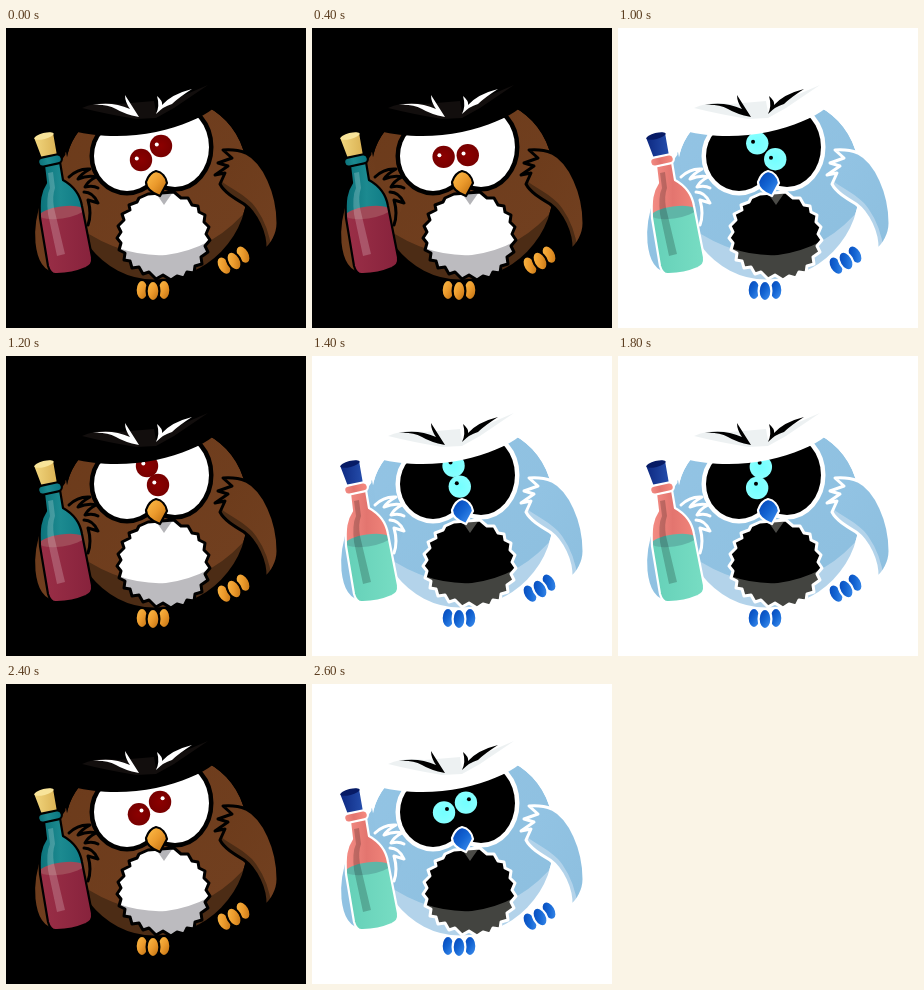
Recreate the animation shown at these times as an HTML page. Size 300 by 300 pixels, loop 2.8 s.

```html
<!DOCTYPE html>
<html lang="en">
<head>
<meta charset="utf-8">
<title>Dizzy owl</title>
<style>
  html, body { margin: 0; width: 100%; height: 100%; overflow: hidden; background: #000; }
  svg { display: block; width: 100vw; height: 100vh; }
  svg.negative { filter: invert(1); }
  .ink { stroke: #000; stroke-width: 3; stroke-linejoin: round; stroke-linecap: round; }
  .thin { stroke-width: 2.2; }
  .thick { stroke-width: 7; }
  .line { fill: none; }
</style>
</head>
<body>
<svg id="owl" viewBox="0 0 300 300">
  <defs>
    <linearGradient id="brown" x1="0" y1="0" x2="1" y2="1">
      <stop offset="0" stop-color="#6c3b1b"/><stop offset="1" stop-color="#724020"/>
    </linearGradient>
    <linearGradient id="orange" x1="0" y1="0" x2="1" y2="1">
      <stop offset="0" stop-color="#ffc04c"/><stop offset=".5" stop-color="#eb9a2c"/><stop offset="1" stop-color="#b8680c"/>
    </linearGradient>
    <linearGradient id="cork" x1="0" x2="1">
      <stop offset="0" stop-color="#f3d880"/><stop offset="1" stop-color="#d9b052"/>
    </linearGradient>
    <linearGradient id="glass" x1="0" x2="1">
      <stop offset="0" stop-color="#0b727a"/><stop offset=".4" stop-color="#1c8a90"/><stop offset="1" stop-color="#087480"/>
    </linearGradient>
    <linearGradient id="wine" x1="0" x2="1">
      <stop offset="0" stop-color="#9c3048"/><stop offset="1" stop-color="#84203a"/>
    </linearGradient>
    <radialGradient id="iris">
      <stop offset="0" stop-color="#8c0000"/><stop offset="1" stop-color="#780000"/>
    </radialGradient>
    <path id="body" d="M58 140C60 102 90 72 150 70C200 62 243 95 243 150C246 212 200 253 148 253C95 253 56 202 58 140Z"/>
    <path id="belly" d="M142 166L133 170 131 174 123 177 124 182 116 186 118 192 112 198 115 204 111 210 115 215 113 222 119 225 118 232 124 233 126 240 133 239 137 246 143 244 150 251 157 247 165 252 171 248 178 250 181 244 188 245 189 238 196 236 195 229 202 224 199 218 204 212 200 206 203 199 198 194 199 187 193 184 192 178 186 177 182 170 175 170 168 164Z"/>
    <path id="bottle" d="M38 138L54 134 57 152C66 157 74 166 76 178L86 229C87 236 84 238 80 240Q66 246 51 246C46 247 43 242 42 238L34 190C33 172 34 164 40 155Z"/>
    <path id="wing" d="M240 125C258 134 272 165 272 195C272 206 266 217 259 222C260 205 250 185 238 176C228 170 218 164 214 156L219 145 209 147 222 138 212 135 226 130 217 122Q230 121 240 125Z"/>
    <path id="shade" d="M60 190Q110 230 160 227Q215 220 250 170V270H60Z"/>
    <clipPath id="inBody"><use href="#body"/></clipPath>
    <clipPath id="inBelly"><use href="#belly"/></clipPath>
    <clipPath id="inBottle"><use href="#bottle"/></clipPath>
    <clipPath id="inWing"><use href="#wing"/></clipPath>
    <ellipse id="toe" rx="6.4" ry="10" class="ink thin" fill="url(#orange)"/>
    <g id="foot">
      <use href="#toe" x="-11" y="-1"/><use href="#toe" x="11" y="-1"/><use href="#toe"/>
    </g>
  </defs>

  <rect width="300" height="300"/>

  <use href="#body" class="ink" fill="url(#brown)"/>
  <use href="#shade" fill="#4c2c15" clip-path="url(#inBody)"/>
  <use href="#body" class="ink line"/>

  <use href="#foot" x="147" y="263"/>
  <use href="#foot" transform="translate(228 233) rotate(-30)"/>

  <use href="#belly" fill="#fff"/>
  <g clip-path="url(#inBelly)">
    <use href="#shade" fill="#bcbbbf"/>
    <path d="M149 164L167 164 158 177Z" fill="#b4b4b8"/>
  </g>
  <use href="#belly" class="ink line"/>

  <use href="#wing" fill="url(#brown)"/>
  <path d="M208 148C222 160 240 166 250 180Q264 200 266 226H240L205 170Z" fill="#4c2c15" clip-path="url(#inWing)"/>
  <use href="#wing" class="ink line"/>

  <path d="M60 124C40 150 25 185 28 215C30 235 38 245 50 246C72 240 82 215 86 190L92 174 91 160 80 157 90 149 73 150 84 141 64 145Z" fill="url(#brown)"/>
  <path class="ink line" d="M58 126C40 150 25 185 28 215C30 235 38 245 50 246M63 149Q72 140 84 141Q75 146 72 151Q82 147 90 149Q82 153 79 159Q87 157 92 160M78 164Q87 164 92 175L82 172Q86 186 82 197"/>

  <g fill="#fff">
    <g class="ink thick">
      <ellipse cx="121" cy="128" rx="34" ry="36"/><ellipse cx="169" cy="119" rx="35" ry="41"/>
    </g>
    <ellipse cx="121" cy="128" rx="33" ry="35"/><ellipse cx="169" cy="119" rx="34" ry="40"/>
  </g>

  <g class="pupil"><circle r="11.2" fill="url(#iris)"/><circle class="glint" r="2" fill="#fff"/></g>
  <g class="pupil"><circle r="11.2" fill="url(#iris)"/><circle class="glint" r="2" fill="#fff"/></g>

  <path d="M68 103C90 109 122 110 150 104C176 98 195 90 208 80L216 52 150 60 140 66 68 68Z"/>
  <path d="M76 80Q92 73 112 76L148 73 150 84 162 74 202 57 168 80 150 90 130 91Q100 86 76 80Z" fill="#120e0d"/>
  <g fill="#fff">
    <path d="M87 77Q106 73 124 81Q119 74 119 67Q126 78 133 89Q118 86 110 81Q100 76 87 77Z"/>
    <path d="M150 86Q154 78 151 68Q157 73 156 77Q166 66 186 61Q172 70 166 76Q158 78 150 86Z"/>
  </g>

  <path class="ink thin" d="M150 143C156 144 160 149 161 155L154 168C146 165 140 160 140 154C142 148 146 144 150 143Z" fill="url(#orange)"/>

  <use href="#bottle" fill="url(#glass)"/>
  <g clip-path="url(#inBottle)">
    <path d="M30 188L80 181 95 255H35Z" fill="url(#wine)"/>
    <ellipse cx="55.5" cy="184.5" rx="22" ry="6" transform="rotate(-8 55.5 184.5)" fill="#a04a58"/>
    <path d="M42 145L47 144 49 160Q46 168 48 180L59 226 51 228 42 186Q40 168 44 160Z" fill="#fff" opacity=".2"/>
  </g>
  <use href="#bottle" class="ink thin line"/>
  <path class="ink thin" d="M27 110Q37 102 48 104L52 127Q44 133 35 131Z" fill="url(#cork)"/>
  <ellipse cx="38" cy="108" rx="10" ry="3" transform="rotate(-14 38 108)" fill="#f8e49a"/>
  <rect class="ink thin" x="32" y="128" width="24" height="9" rx="4.5" transform="rotate(-12 44 132.5)" fill="url(#glass)"/>
</svg>

<script>
  const STEP = 200, STEPS = 14;
  // step, centre x, centre y, angle of the pupil pair, distance between pupils
  const poses = [
    [0, 145, 125, -35, 24.4],
    [2, 143.7, 128, -4, 24.2],
    [4, 150, 127, 23, 26],
    [6, 146.5, 119.5, 60, 22],
    [9, 141, 121.5, 100, 21.3],
    [11, 144, 124.7, 143, 25],
    [13, 143, 123.5, 156, 24]
  ];
  const owl = document.getElementById('owl');
  const pupils = [...owl.querySelectorAll('.pupil')];
  const glints = [...owl.querySelectorAll('.glint')];
  const rad = deg => deg * Math.PI / 180;

  function poseAt(step) {
    const i = Math.max(1, poses.findIndex(p => p[0] >= step));
    const a = poses[i - 1], b = poses[i];
    const k = (step - a[0]) / (b[0] - a[0]);
    return a.map((v, n) => v + (b[n] - v) * k);
  }

  function move(el, x, y) {
    el.setAttribute('transform', `translate(${x} ${y})`);
  }

  function draw(now) {
    const step = Math.floor(now / STEP) % STEPS;
    const [, cx, cy, angle, gap] = poseAt(step);
    const dx = Math.cos(rad(angle)) * gap / 2, dy = Math.sin(rad(angle)) * gap / 2;
    const shine = rad(Math.max(200, angle + 155));
    owl.classList.toggle('negative', step % 2 === 1);
    move(pupils[0], cx - dx, cy - dy);
    move(pupils[1], cx + dx, cy + dy);
    glints.forEach(g => move(g, Math.cos(shine) * 4.5, Math.sin(shine) * 4.5));
  }

  function tick() {
    draw(performance.now());
    requestAnimationFrame(tick);
  }
  tick();
</script>
</body>
</html>
```
